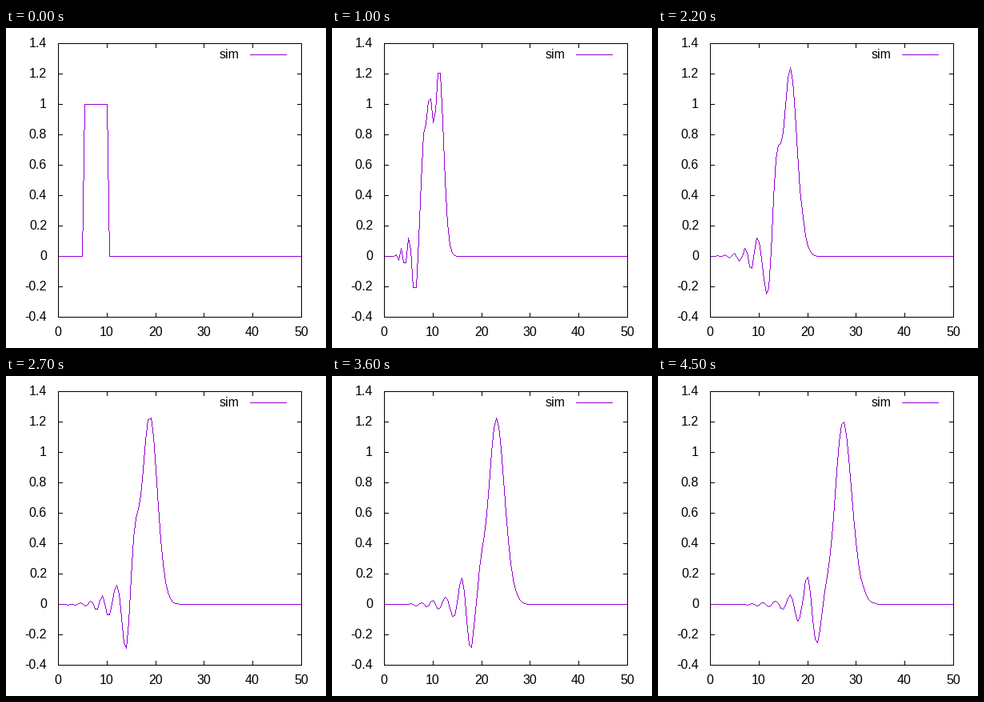
Write a matplotlib script that moves like this. It is 400 px wide and 400 px high and loops after 4.6 s.

```python
"""Square pulse advected with the Lax-Wendroff scheme."""
import numpy as np
import matplotlib.pyplot as plt
from matplotlib.animation import FuncAnimation

SIZE, DPI = 400, 100
PX = 72 / DPI                      # one pixel in points
LEFT, RIGHT, TOP, BOTTOM = 65, 369, 19, 361
TICK = 5
BLACK, PURPLE = (0, 0, 0), (148, 0, 211)

CELLS, CFL, STEPS = 100, 0.2, 5    # five solver steps per picture
HOLD, FRAMES = 5, 46


def advance(u):
    """One Lax-Wendroff step with fixed ends."""
    new = u.copy()
    left, mid, right = u[:-2], u[1:-1], u[2:]
    new[1:-1] = (mid - CFL / 2 * (right - left)
                 + CFL ** 2 / 2 * (right - 2 * mid + left))
    return new


def simulate():
    u = np.zeros(CELLS + 1)
    u[11:21] = 1
    states = [u]
    for _ in range(FRAMES - HOLD - 1):
        for _ in range(STEPS):
            u = advance(u)
        states.append(u)
    return states


def nearest(v):
    return np.floor(np.asarray(v) + 0.5).astype(int)


def stroke(canvas, xs, ys, color):
    """Polyline one pixel wide, without smoothing."""
    xs, ys = nearest(xs), nearest(ys)
    for x0, y0, x1, y1 in zip(xs, ys, xs[1:], ys[1:]):
        n = max(abs(x1 - x0), abs(y1 - y0)) + 1
        canvas[nearest(np.linspace(y0, y1, n)),
               nearest(np.linspace(x0, x1, n))] = color


def label(x, y, text, ha):
    ax.text(x, y + 5, text, ha=ha, va="baseline", color="black",
            family="Liberation Sans", fontsize=16 * PX)


states = simulate()

fig = plt.figure(figsize=(SIZE / DPI, SIZE / DPI), dpi=DPI, facecolor="white")
ax = fig.add_axes([0, 0, 1, 1])
ax.axis("off")

# Ticks, labels and legend
base = np.full((SIZE, SIZE, 3), 255, np.uint8)
image = ax.imshow(base, extent=(0, SIZE, SIZE, 0), interpolation="nearest",
                  aspect="auto")

for i in range(10):
    y = TOP + 38 * i
    stroke(base, [LEFT, LEFT + TICK], [y, y], BLACK)
    stroke(base, [RIGHT - TICK, RIGHT], [y, y], BLACK)
    label(51, y, f"{(7 - i) / 5:g}", "right")

for i in range(6):
    x = LEFT + 60.8 * i
    stroke(base, [x, x], [TOP, TOP + TICK], BLACK)
    stroke(base, [x, x], [BOTTOM - TICK, BOTTOM], BLACK)
    label(nearest(x), 380, str(10 * i), "center")

label(291, 33, "sim", "right")
stroke(base, [305, 350], [33, 33], PURPLE)

grid = np.linspace(LEFT, RIGHT, CELLS + 1)


def draw(i):
    canvas = base.copy()
    u = states[max(0, i - HOLD)]
    stroke(canvas, grid, BOTTOM - nearest(190 * (u + 0.4)), PURPLE)
    stroke(canvas, [LEFT, RIGHT, RIGHT, LEFT, LEFT],
           [TOP, TOP, BOTTOM, BOTTOM, TOP], BLACK)
    image.set_data(canvas)
    return image,


anim = FuncAnimation(fig, draw, frames=FRAMES, interval=100,
                     init_func=lambda: draw(0), repeat=True,
                     repeat_delay=0, blit=False)
plt.show()
```
